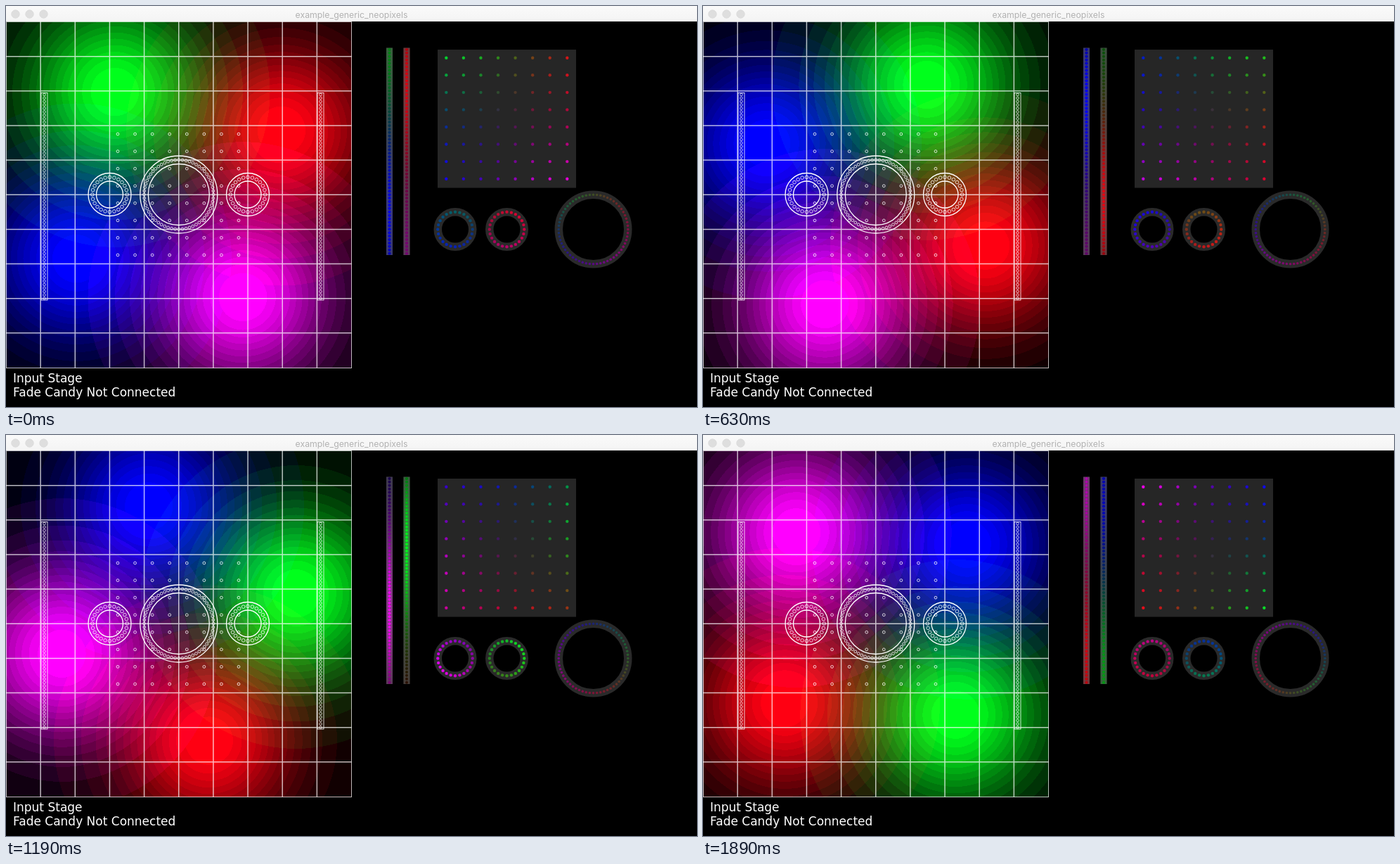
An HTML page with a canvas for the animation above (1960 ms loop, 983 by 570 pixels).

```html
<!DOCTYPE html>
<html lang="en">
<head>
<meta charset="utf-8">
<title>example_generic_neopixels</title>
<style>
html, body { margin: 0; width: 983px; height: 570px; overflow: hidden; background: #000; }
canvas { display: block; }
</style>
</head>
<body>
<canvas id="stage" width="983" height="570"></canvas>
<script>
const ctx = document.getElementById('stage').getContext('2d');
const STEP = 70, LOOP = 1960, TAU = Math.PI * 2;
const FIELD = { x: 0, y: 22, w: 492, h: 493 };
const CELL = 49.15, CX = 246, CY = 268, ORBIT = 172, SIGMA = 84, LEVELS = 15;
const COLORS = [[0, 255, 28], [255, 0, 18], [255, 0, 255], [0, 0, 255]];
const image = ctx.createImageData(FIELD.w, FIELD.h);

// Layouts: input position (x, y) and output position (ox, oy).
const range = (n, f) => Array.from({ length: n }, (_, i) => f(i));
const ringLeds = (n, r) => range(n, i => [r * Math.cos(i / n * TAU), r * Math.sin(i / n * TAU)]);
const strips = [{ x: 54.5, ox: 545.5 }, { x: 447.5, ox: 570 }].map(s => ({
  ...s, y: 123.5, oy: 59.5, leds: range(60, i => [0, 2.45 + i * 4.91])
}));
const rings = [
  { x: 147.5, ox: 639, outer: 30.5, inner: 19, leds: ringLeds(24, 24.7), r: 2.3 },
  { x: 344, ox: 712.5, outer: 30.5, inner: 19, leds: ringLeds(24, 24.7), r: 2.3 },
  { x: 245.8, ox: 835.5, outer: 55, inner: 43.5, leds: ringLeds(60, 49.3), r: 1.9 }
].map(r => ({ ...r, y: 268, oy: 317.5 }));
const matrix = {
  x: 159, y: 182, ox: 626.3, oy: 73.7,
  leds: range(64, i => [i % 8 * 24.57, (i >> 3) * 24.57])
};

function blobsAt(frame) {
  return COLORS.map((color, i) => {
    const a = (-32 + 6.33 * frame + 90 * i) * Math.PI / 180;
    return { color, x: CX + ORBIT * Math.sin(a), y: CY - ORBIT * Math.cos(a) };
  });
}

const bell = d => Math.exp(-d * d / (2 * SIGMA * SIGMA));

function sample(blobs, x, y) {
  const sum = [0, 0, 0];
  for (const b of blobs) {
    const w = Math.min(1, 1.05 * bell(x - b.x) * bell(y - b.y));
    b.color.forEach((v, k) => sum[k] += w * v);
  }
  return sum.map(v => Math.min(255, Math.round(v)));
}

function drawField(blobs) {
  const layers = blobs.map(b => ({
    color: b.color,
    gx: range(FIELD.w, x => bell(x + 0.5 - b.x)),
    gy: range(FIELD.h, y => 1.05 * bell(y + FIELD.y + 0.5 - b.y))
  }));
  const data = image.data;
  for (let y = 0, p = 0; y < FIELD.h; y++) {
    for (let x = 0; x < FIELD.w; x++, p += 4) {
      let r = 0, g = 0, b = 0;
      for (const { color, gx, gy } of layers) {
        const w = Math.round(Math.min(1, gx[x] * gy[y]) * LEVELS) / LEVELS;
        r += w * color[0];
        g += w * color[1];
        b += w * color[2];
      }
      data[p] = r;
      data[p + 1] = g;
      data[p + 2] = b;
      data[p + 3] = 255;
    }
  }
  ctx.putImageData(image, FIELD.x, FIELD.y);
}

function circle(x, y, r) {
  ctx.beginPath();
  ctx.arc(x, y, r, 0, TAU);
}

function outline(x, y, r, width) {
  circle(x, y, r);
  ctx.lineWidth = width;
  ctx.stroke();
}

function drawInput() {
  ctx.strokeStyle = 'rgba(255,255,255,.72)';
  ctx.lineWidth = 1.5;
  ctx.beginPath();
  for (let i = 1; i < 10; i++) {
    const x = i * CELL, y = FIELD.y + 0.5 + i * CELL;
    ctx.moveTo(x, FIELD.y);
    ctx.lineTo(x, 514.5);
    ctx.moveTo(0, y);
    ctx.lineTo(491.5, y);
  }
  ctx.stroke();
  ctx.lineWidth = 1;
  ctx.strokeRect(0.5, 22.5, 491, 492);

  ctx.strokeStyle = '#fff';
  for (const s of strips) {
    ctx.lineWidth = 0.8;
    ctx.strokeRect(s.x - 4.5, s.y, 9, 294.5);
    for (const [, dy] of s.leds) outline(s.x, s.y + dy, 1.8, 0.75);
  }
  for (const r of rings) {
    outline(r.x, r.y, r.outer, 1.3);
    outline(r.x, r.y, r.inner, 1.3);
    for (const [dx, dy] of r.leds) outline(r.x + dx, r.y + dy, r.r, 0.8);
  }
  for (const [dx, dy] of matrix.leds) outline(matrix.x + dx, matrix.y + dy, 1.9, 0.8);
}

function drawLeds(part, blobs, radius, halo) {
  for (const [dx, dy] of part.leds) {
    const [r, g, b] = sample(blobs, part.x + dx, part.y + dy);
    const x = part.ox + dx, y = part.oy + dy;
    if (halo) {
      ctx.fillStyle = `rgba(${r},${g},${b},.3)`;
      ctx.fillRect(x - 4.5, y - 2.45, 9, 4.91);
    }
    ctx.fillStyle = `rgb(${r},${g},${b})`;
    circle(x, y, radius);
    ctx.fill();
  }
}

function drawOutput(blobs) {
  for (const s of strips) {
    ctx.fillStyle = '#505050';
    ctx.fillRect(s.ox - 4.5, s.oy, 9, 294.5);
    drawLeds(s, blobs, 2, true);
  }
  ctx.fillStyle = '#262626';
  ctx.fillRect(614, 62, 197, 196.5);
  drawLeds(matrix, blobs, 2.2);
  for (const r of rings) {
    ctx.strokeStyle = '#2a2a2a';
    outline(r.ox, r.oy, (r.outer + r.inner) / 2, r.outer - r.inner);
    drawLeds(r, blobs, r.r - 0.1);
  }
}

function drawWindow() {
  const bar = ctx.createLinearGradient(0, 0, 0, 22);
  bar.addColorStop(0, '#fafafa');
  bar.addColorStop(1, '#f4f4f4');
  ctx.fillStyle = bar;
  ctx.fillRect(0, 0, 983, 22);
  ctx.fillStyle = '#dedede';
  ctx.strokeStyle = '#cbcbcb';
  for (const x of [13.5, 33.5, 53.5]) {
    outline(x, 11.5, 5.5, 1);
    ctx.fill();
  }
  ctx.fillStyle = '#b2b2b2';
  ctx.font = '12.3px Inter, sans-serif';
  ctx.textAlign = 'center';
  ctx.fillText('example_generic_neopixels', 491.5, 16.5);
  ctx.fillStyle = '#fff';
  ctx.font = '17px "DejaVu Sans", sans-serif';
  ctx.textAlign = 'left';
  ctx.fillText('Input Stage', 10, 535);
  ctx.fillText('Fade Candy Not Connected', 10, 555);
}

let shown = -1;
function draw(now) {
  const frame = Math.floor(now % LOOP / STEP);
  if (frame !== shown) {
    shown = frame;
    const blobs = blobsAt(frame);
    ctx.fillStyle = '#000';
    ctx.fillRect(0, 0, 983, 570);
    drawField(blobs);
    drawInput();
    drawOutput(blobs);
    drawWindow();
  }
  requestAnimationFrame(() => draw(performance.now()));
}
draw(0);
</script>
</body>
</html>
```
